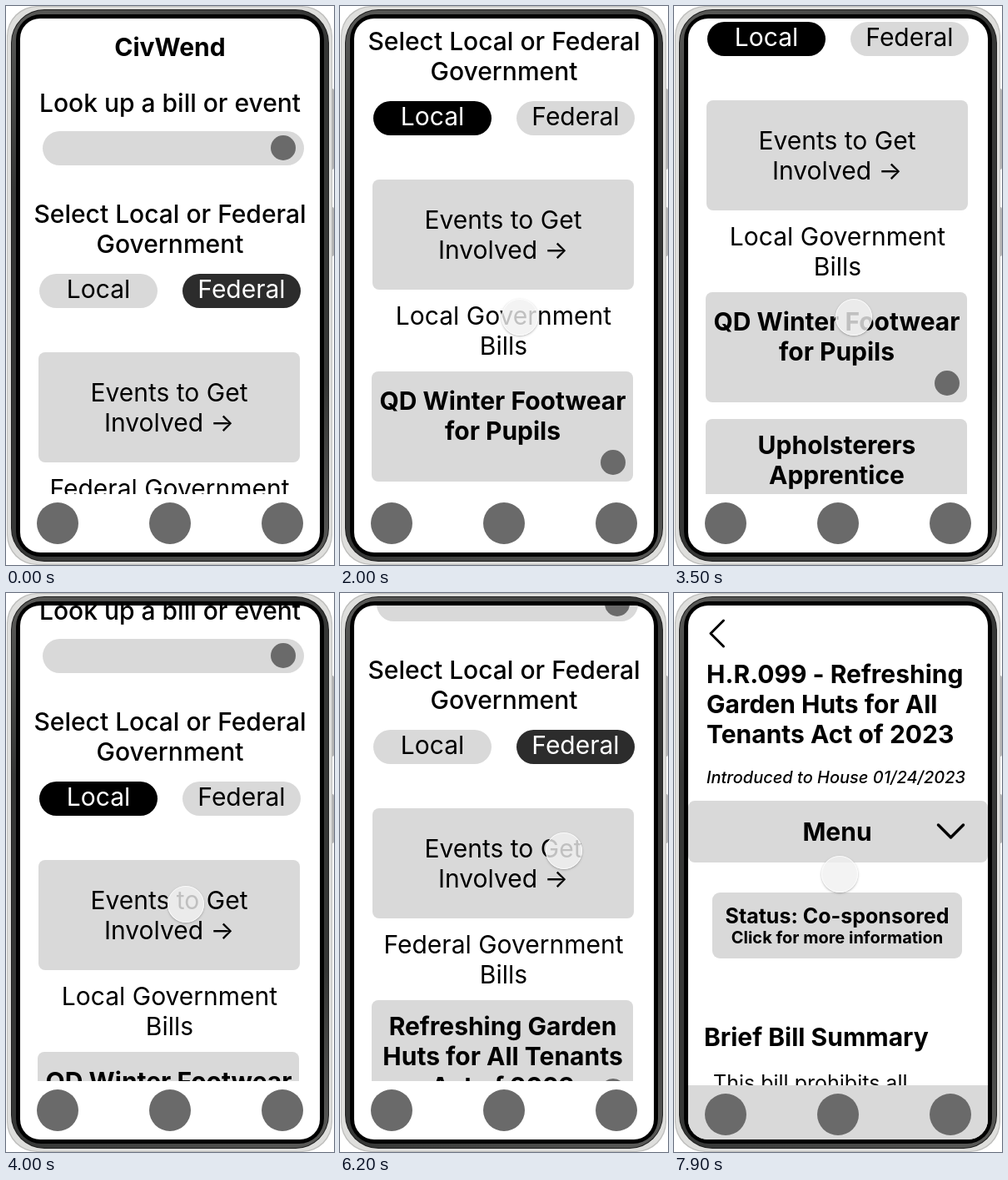
Recreate the animation shown at these times as an HTML page with a canvas. Size 394x670 px, loop 8000 ms.

```html
<!DOCTYPE html>
<html lang="en">
<head>
<meta charset="utf-8">
<title>Bill browser prototype</title>
<style>
  html, body { margin: 0; width: 100%; height: 100%; overflow: hidden; background: #fff; }
  canvas { display: block; width: 394px; height: 670px; }
</style>
</head>
<body>
<canvas id="stage"></canvas>
<script>
const W = 394, H = 670, LOOP = 8000, STEP = 100;
const GREY = '#d9d9d9', DOT = '#6a6a6a';
const LINE = 36;
const canvas = document.getElementById('stage');
const ctx = canvas.getContext('2d');
const ratio = window.devicePixelRatio || 1;
canvas.width = W * ratio;
canvas.height = H * ratio;
ctx.scale(ratio, ratio);

const progress = (t, start, end) => Math.min(1, Math.max(0, (t - start) / (end - start)));
const easeOut = u => 1 - (1 - u) ** 1.86;
const easeInOut = u => Math.sin(u * Math.PI / 2) ** 2;
const mix = (a, b, u) => a + (b - a) * u;

const localScroll = t =>
  391 * easeOut(progress(t, 1600, 2800)) - 338 * easeInOut(progress(t, 3100, 4266));
const federalScroll = t => 300 * easeInOut(progress(t, 5600, 6766));

const entry = { x: 197, y: 373 };
const touchMoves = [
  { start: 500, end: 800, x: 137, y: 343 },
  { start: 1300, end: 1500, x: 216, y: 373 },
  { start: 4300, end: 4700, x: 273, y: 297 },
  { start: 5600, end: 6000, x: 269, y: 309 },
  { start: 6700, end: 7100, x: 250, y: 372 },
  { start: 7400, end: 7900, x: 199, y: 337 }
];

function touchAt(t) {
  return touchMoves.reduce((from, to) => {
    const u = progress(t, to.start, to.end);
    return { x: mix(from.x, to.x, u), y: mix(from.y, to.y, u) };
  }, entry);
}

const localBills = [
  { y: 645, title: ['QD Winter Footwear', 'for Pupils'] },
  { y: 797, title: ['Upholsterers', 'Apprentice', 'Certification'] },
  { y: 959, title: ['Orchard Ladder', 'Inspections'] }
];
const federalBills = [
  { y: 645, title: ['Refreshing Garden', 'Huts for All Tenants', 'Act of 2023'] },
  { y: 797, title: ['Harbor Lantern', 'Upkeep Act'] }
];

function box(x, y, w, h, r, fill) {
  ctx.beginPath();
  ctx.roundRect(x, y, w, h, r);
  ctx.fillStyle = fill;
  ctx.fill();
}

function disc(x, y, r, fill = DOT) {
  ctx.beginPath();
  ctx.arc(x, y, r, 0, Math.PI * 2);
  ctx.fillStyle = fill;
  ctx.fill();
}

function text(str, x, y, { weight = 400, size = 30, align = 'center', color = '#000', style = 'normal' } = {}) {
  ctx.font = `${style} ${weight} ${size}px Inter, sans-serif`;
  ctx.textAlign = align;
  ctx.fillStyle = color;
  ctx.fillText(str, x, y);
}

function lines(list, x, y, options) {
  list.forEach((line, i) => text(line, x, y + i * LINE, options));
}

// A right-angled chevron whose tip is at (x, y).
function chevron(x, y, size, angle, width) {
  ctx.save();
  ctx.translate(x, y);
  ctx.rotate(angle);
  ctx.beginPath();
  ctx.moveTo(-size, -size);
  ctx.lineTo(0, 0);
  ctx.lineTo(size, -size);
  ctx.lineWidth = width;
  ctx.lineCap = ctx.lineJoin = 'round';
  ctx.strokeStyle = '#000';
  ctx.stroke();
  ctx.restore();
}

function diagonal(...colors) {
  const gradient = ctx.createLinearGradient(0, 0, W, H);
  colors.forEach((color, i) => gradient.addColorStop(i / (colors.length - 1), color));
  return gradient;
}

function drawBody() {
  box(390, 99, 4, 97, 2, '#b5b5b5');
  box(390, 241, 4, 59, 2, '#b5b5b5');
  box(1, 0, 391, 670, 36, '#bdbdbb');
  box(2, 1, 389, 668, 36, '#deded c'.replace(' ', ''));
  box(6, 4, 382, 662, 40, '#1c1c1c');
  box(7, 5, 380, 660, 39, diagonal('#5c5c5a', '#363736', '#363736', '#363736', '#5c5c5a'));
  box(12, 10, 370, 650, 30, '#000');
}

function drawPill(label, x, active, activeColor) {
  box(x, 321, 142, 41, 20.5, active ? activeColor : GREY);
  text(label, x + 71, 350, { color: active ? '#fff' : '#000' });
}

function drawCard({ y, title }) {
  box(38, y, 314, 132, 8, GREY);
  disc(328, y + 109, 15);
  lines(title, 195.5, y + 54 - 4 * title.length, { weight: 700 });
}

function drawNav(y) {
  for (let i = 0; i < 3; i++) disc(62 + i * 135, y, 25);
}

function drawHome(isLocal, scroll) {
  ctx.save();
  ctx.beginPath();
  ctx.rect(17, 15, 360, 570);
  ctx.clip();
  ctx.translate(0, -Math.round(scroll));
  text('CivWend', 197, 60, { weight: 700 });
  text('Look up a bill or event', 197, 127, { weight: 500 });
  box(44, 150, 314, 41, 20.5, GREY);
  disc(333, 170, 15);
  lines(['Select Local or Federal', 'Government'], 197, 260, { weight: 500 });
  drawPill('Local', 40, isLocal, '#000');
  drawPill('Federal', 212, !isLocal, '#2c2c2c');
  box(39, 415, 314, 132, 8, GREY);
  lines(['Events to Get', 'Involved →'], 196, 474);
  lines([(isLocal ? 'Local' : 'Federal') + ' Government', 'Bills'], 196.5, 589);
  (isLocal ? localBills : federalBills).forEach(drawCard);
  ctx.restore();
  drawNav(620);
}

function drawDetail() {
  const heading = { weight: 700, align: 'left' };
  chevron(44, 48.5, 15.5, Math.PI / 2, 3);
  lines(['H.R.099 - Refreshing', 'Garden Huts for All', 'Tenants Act of 2023'], 39, 108, heading);
  text('Introduced to House 01/24/2023', 39, 228, { weight: 500, size: 20, align: 'left', style: 'italic' });
  box(17, 249, 360, 74, 8, GREY);
  text('Menu', 196, 297, { weight: 700 });
  chevron(332.5, 293, 15, 0, 3.5);
  box(46, 359, 300, 79, 9, GREY);
  text('Status: Co-sponsored', 196, 396, { weight: 700, size: 25 });
  text('Click for more information', 196, 420, { weight: 700, size: 20 });
  text('Brief Bill Summary', 36, 543, heading);
  text('This bill prohibits all', 47, 596, { size: 25, align: 'left' });
  box(17, 590, 360, 65, 0, GREY);
  drawNav(625);
}

function drawPointer(x, y) {
  ctx.beginPath();
  ctx.moveTo(x, y);
  ctx.lineTo(x, y + 16);
  ctx.lineTo(x + 4, y + 12);
  ctx.lineTo(x + 11, y + 11);
  ctx.closePath();
  ctx.lineWidth = 2;
  ctx.strokeStyle = '#fff';
  ctx.stroke();
  ctx.fillStyle = '#000';
  ctx.fill();
}

function drawTouch({ x, y }) {
  // Shadow is kept outside the translucent disc.
  ctx.save();
  ctx.beginPath();
  ctx.rect(0, 0, W, H);
  ctx.arc(x, y, 22, 0, Math.PI * 2);
  ctx.clip('evenodd');
  ctx.shadowColor = 'rgba(0,0,0,.4)';
  ctx.shadowBlur = 3 * ratio;
  ctx.shadowOffsetY = ratio;
  disc(x, y, 21.5, '#fff');
  ctx.restore();
  disc(x, y, 22, 'rgba(241,241,241,.8)');
  ctx.beginPath();
  ctx.arc(x, y, 21.5, 0, Math.PI * 2);
  ctx.lineWidth = 1;
  ctx.strokeStyle = 'rgba(255,255,255,.8)';
  ctx.stroke();
}

function draw(t) {
  ctx.fillStyle = '#fff';
  ctx.fillRect(0, 0, W, H);
  drawBody();
  ctx.save();
  ctx.beginPath();
  ctx.roundRect(17, 15, 360, 640, 24);
  ctx.clip();
  ctx.fillStyle = '#fff';
  ctx.fillRect(17, 15, 360, 640);
  const isLocal = t >= 1100 && t < 5100;
  if (t >= 7500) drawDetail();
  else drawHome(isLocal, isLocal ? localScroll(t) : federalScroll(t));
  ctx.restore();
  if (t >= 500) drawTouch(touchAt(t));
  else if (t >= 100) drawPointer(entry.x - 1, mix(648, entry.y, progress(t, 100, 300)));
}

let start;
function tick(now) {
  start ??= now;
  const elapsed = Math.max(0, now - start) % LOOP;
  draw(Math.floor(elapsed / STEP) * STEP);
  requestAnimationFrame(tick);
}
requestAnimationFrame(tick);
</script>
</body>
</html>
```
